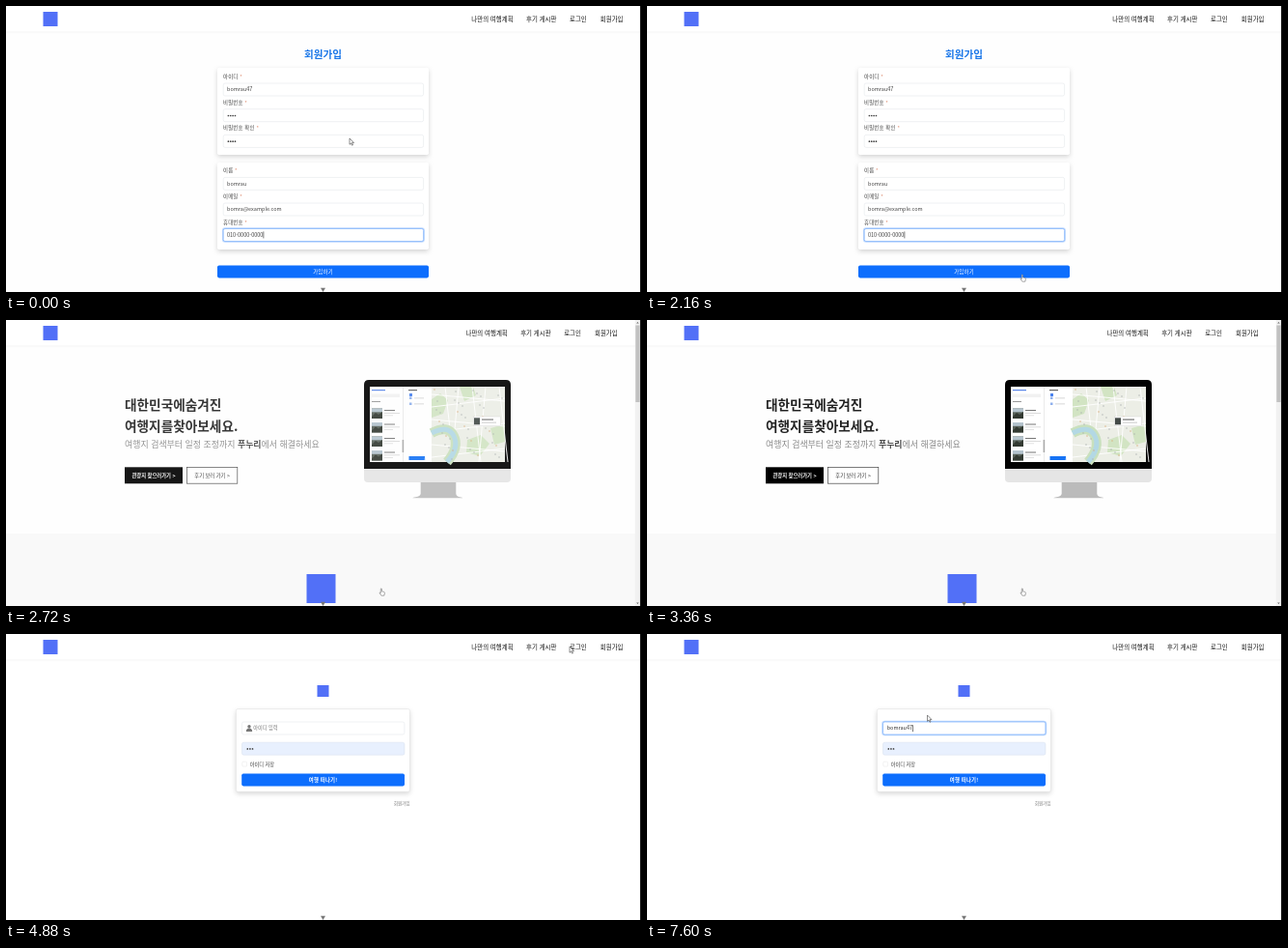
Animation, 658 px wide and 296 px high, one loop 8000 ms. Source, as an HTML page:

```html
<!DOCTYPE html>
<html lang="ko">
<head>
<meta charset="utf-8">
<title>회원가입</title>
<style>
  html, body { margin: 0; width: 100%; height: 100%; overflow: hidden; background: #fff; }
  svg { display: block; width: 100%; height: 100%; }
  text { font-family: "Noto Sans CJK KR", "Noto Sans CJK", "Noto Sans", sans-serif; white-space: pre; }
  .card { fill: #fff; filter: drop-shadow(0 2.5px 2.6px rgba(0, 0, 0, .17)); }
  .bar { fill: #fff; filter: drop-shadow(0 .8px 1.2px rgba(0, 0, 0, .1)); }
  .label { letter-spacing: .2px; }
</style>
</head>
<body>
<svg id="stage" viewBox="0 0 658 296" xmlns="http://www.w3.org/2000/svg"></svg>
<script>
const LOOP = 8000, HOME_AT = 2320, LOGIN_AT = 4800, FOCUS_AT = 5520;
const FADE_AT = 2460, FADE_TIME = 330;
const USER = 'bomrau47';
const KEY_TIMES = [6320, 6400, 6560, 6800, 7040, 7120, 7440, 7600];
const BLUE = '#0d6efd', LOGO = '#5270f7';

// Pointer keys: time, x, y, shape used from that time on
const POINTER = [
  [0, 356, 137, 'arrow'], [300, 356, 137, 'arrow'], [1180, 416, 271, 'hand'],
  [1380, 418.5, 279, 'hand'], [1500, 418.5, 279, 'hand'], [1900, 388, 277.5, 'hand'],
  [3500, 388, 277.5, 'arrow'], [4330, 588.6, 11.7, 'hand'], [4840, 588.6, 11.7, 'arrow'],
  [5400, 290, 93, 'arrow'], [5520, 290, 93, 'arrow'], [5700, 289.5, 86, 'arrow'],
  [7020, 289.5, 86, 'arrow'], [7120, 290.5, 84, 'arrow'], [LOOP, 290.5, 84, 'arrow']
];

const rect = (x, y, w, h, fill, more = '') =>
  `<rect x="${x}" y="${y}" width="${w}" height="${h}" fill="${fill}" ${more}/>`;
const path = (d, fill, more = '') => `<path d="${d}" fill="${fill}" ${more}/>`;
const text = (x, y, size, str, fill, more = '') =>
  `<text x="${x}" y="${y}" font-size="${size}" fill="${fill}" ${more}>${str}</text>`;
const group = (id, body, more = '') => `<g id="${id}" ${more}>${body}</g>`;
const times = (n, fn) => Array.from({ length: n }, (_, i) => fn(i)).join('');
const dots = (n, x, y, step, r) =>
  times(n, i => `<circle cx="${x + i * step}" cy="${y}" r="${r}" fill="#444"/>`);
const square = (cx, cy, s) => rect(cx - s / 2, cy - s / 2, s, s, LOGO);
const card = (x, y, w, h) => rect(x, y, w, h, '#fff', 'class="card" rx="1.8"');
const MID = 'text-anchor="middle"', BOLD = 'font-weight="700"';

const field = (x, y, w) =>
  rect(x, y, w, 13, '#fff', 'rx="1.8" stroke="#dfe3e7" stroke-width=".5"');
const ring = (x, y, w) =>
  rect(x, y, w, 13, 'none', 'rx="2" stroke="#0d6efd" stroke-opacity=".27" stroke-width="2.6"') +
  rect(x, y, w, 13, '#fff', 'rx="1.8" stroke="#7fb2fd" stroke-width=".7"');
const button = (x, y, w, str, weight) =>
  rect(x, y, w, 13, BLUE, 'rx="1.8"') +
  text(x + w / 2, y + 8.5, 5.4, str, '#fff', `${MID} font-weight="${weight}" class="label"`);

function header() {
  const items = [[482.3, '나만의 여행계획'], [539, '후기 게시판'], [584, '로그인'], [615.8, '회원가입']];
  const nav = items.map(([x, s]) => text(x, 15.7, 6.45, s, '#111', 'font-weight="500"')).join('');
  return rect(0, -5, 658, 31.5, '#fff', 'class="bar"') + square(46, 13.5, 15) + group('nav', nav);
}

function signupRow(label, y, value) {
  return text(225, y, 5.4, label + ' <tspan fill="#dc8264">*</tspan>', '#444', 'class="label" font-weight="500"') +
    field(225.2, y + 5, 207.4) +
    (value ? text(229, y + 13.4, 5.5, value, '#444') : dots(4, 230.4, y + 11.8, 2.35, .85));
}

function signupPage() {
  return rect(0, 27, 658, 269, '#fefefe') +
    text(328.5, 54, 10.6, '회원가입', '#1976e8', `${MID} ${BOLD}`) +
    card(219, 64, 219, 90) +
    signupRow('아이디', 75, USER) + signupRow('비밀번호', 101.7) + signupRow('비밀번호 확인', 128.4) +
    card(219, 162, 219, 90) +
    signupRow('이름', 172.4, USER.slice(0, 6)) +
    signupRow('이메일', 199, 'bomra@example.com') +
    signupRow('휴대번호', 225.6) + ring(225.2, 230.5, 207.4) +
    text(229, 239, 5.5, '010-0000-0000', '#444', 'id="phone"') +
    rect(267.2, 233.4, .6, 7, '#222', 'id="phoneCaret"') +
    button(219, 268.4, 219, '가입하기', 500);
}

function mapView() {
  const roads = times(6, i =>
    `M${441 + i * 14} 69l${i % 2 ? 9 : -7} 78M441 ${77 + i * 13}l76 ${i % 2 ? -9 : 7}`);
  const pins = times(44, i =>
    `<circle cx="${444 + i * 29 % 71}" cy="${72 + i * 17 % 73}" r=".7" fill="${i % 4 ? '#a9aeb0' : '#d9a878'}"/>`);
  return rect(441, 69, 76, 78, '#eceee6') +
    path('M441 82l9-6 8 7-5 14-12 4zM470 69l14 0 3 9-12 6zM478 124l14-5 9 9-10 13-14-4zM502 112l15-4v18l-11 3z', '#d2e4c3') +
    path(roads, 'none', 'stroke="#fff" stroke-width=".9"') +
    path('M441 117Q458 108 464 120T457 147', 'none', 'stroke="#c9e0bd" stroke-width="10"') +
    path('M441 117Q458 108 464 120T457 147', 'none', 'stroke="#b3d8e4" stroke-width="5"') +
    pins;
}

function thumb(y) {
  return rect(379, y, 11, 10.4, '#59625a') + rect(379, y, 11, 3.8, '#b4c3cd') +
    path(`M379 ${y + 8.4}l4-4 3 2 4-3v7h-11z`, '#333a32') +
    rect(392, y + 1.5, 11, 1, '#777') + rect(392, y + 4.5, 16, .7, '#ccc') +
    rect(392, y + 7, 9, .7, '#d5d5d5');
}

function screen() {
  return rect(377, 69, 140, 78, '#fff') +
    rect(379, 72, 14, 1.2, '#5a86e8') + rect(379, 76.5, 29, 3.5, '#f1f1f1') +
    rect(379, 84, 9, 1, '#999') + times(4, i => thumb(91.5 + i * 14.5)) +
    rect(411, 69, .6, 78, '#ddd') + rect(410.6, 124, 1.6, 13, '#aaa') +
    rect(417, 72, 9, 1.2, '#666') + rect(418, 76, 3, 3, '#4b83ee') +
    times(2, i => rect(418, 79.5 + i * 6, 2.5, 2.5, '#8fb0ec') + rect(423, 80.5 + i * 6, 10, .8, '#ccc')) +
    rect(417.5, 141, 17, 4, '#1673f5') + mapView() +
    rect(484.5, 100, 28, 9.5, '#fff', 'stroke="#ccc" stroke-width=".4"') +
    rect(485, 101.3, 6, 7, '#444b48') + rect(493, 102.5, 12, 1.1, '#666') + rect(493, 105.7, 15, .8, '#bbb');
}

function hero() {
  return text(123, 93.3, 13.65, '대한민국에숨겨진', '#222', BOLD) +
    text(123, 115.2, 13.65, '여행지를찾아보세요.', '#222', BOLD) +
    text(123, 131.6, 8.95, `여행지 검색부터 일정 조정까지 <tspan fill="#444" ${BOLD}>푸누리</tspan>에서 해결하세요`, '#888', 'font-weight="300"') +
    rect(123, 152.3, 60, 17, '#000') +
    text(153, 162.7, 5.3, '관광지 찾으러가기 &gt;', '#fff', `${MID} ${BOLD}`) +
    rect(187.5, 152.6, 52.3, 16.6, '#fff', 'stroke="#444" stroke-width=".7"') +
    text(213.6, 162.7, 5.3, '후기 보러 가기 &gt;', '#333', `${MID} font-weight="500"`) +
    path('M429.7 167h36.6v12.500q0 3 4 3.700q3 .4 3 1h-52q0-.6 3-1q5.400-.7 5.400-3.700z', '#bbb') +
    path('M371 153h152v11q0 4-4 4h-144q-4 0-4-4z', '#e5e5e5') +
    path('M371 154v-87q0-5 5-5h142q5 0 5 5v87z', '#020202') + screen();
}

function homePage() {
  return rect(0, 27, 658, 194, '#fefefe') + rect(0, 221, 658, 75, '#f9f9f9') +
    group('hero', hero()) + square(326.5, 278, 30);
}

const scrollbar = () =>
  rect(651.8, 0, 5.4, 296, '#f1f1f1') + rect(652.4, 5.5, 4.2, 79.5, '#c1c1c1') +
  path('M653.2 3.5h2.6l-1.3-1.5zM653.2 292.5h2.6l-1.3 1.5z', '#666');

function loginPage() {
  const hint = '<circle cx="252" cy="95.8" r="1.7" fill="#777"/>' +
    path('M248.8 101q0-3.5 3.2-3.5t3.2 3.5z', '#777') +
    text(256.3, 99.3, 5.2, '아이디 입력', '#777');
  return rect(0, 27, 658, 269, '#fff') + square(328.5, 59, 12) +
    card(238.4, 77.6, 180, 85.6) +
    rect(238.4, 77.6, 180, 85.6, 'none', 'rx="1.8" stroke="#ddd" stroke-width=".5"') +
    field(244.5, 91, 168.4) + group('focus', ring(244.5, 91, 168.4)) +
    group('hint', hint) + text(248.7, 99.4, 5.5, '', '#333', 'id="typed"') +
    rect(0, 94.2, .6, 7, '#222', 'id="caret"') +
    rect(244.5, 112.2, 168.4, 13, '#e8f0fe', 'rx="1.8" stroke="#d5deec" stroke-width=".5"') +
    dots(3, 250.3, 118.9, 2.6, .85) +
    rect(244.8, 132.2, 4.8, 4.8, '#fff', 'rx="1" stroke="#ddd" stroke-width=".4"') +
    text(252.8, 136.5, 5.2, '아이디 저장', '#444') +
    button(244.2, 144.4, 168.8, '여행 떠나기!', 700) +
    text(418.6, 176.7, 4.6, '회원가입', '#777', 'text-anchor="end"');
}

const arrow = path('M0 0v6.300l1.500-1.300 1 2.200 1-.4-1-2.200h2z', '#fff', 'stroke="#333" stroke-width=".55"');
const hand = path('M.3.7q.6-1 1.100 0v2.700l2.300.5q.8.300.7 1.100l-.5 2.700h-3l-1.700-2.400q-.3-.9.400-.7l.7.600z',
  '#fff', 'stroke="#555" stroke-width=".5"');

const stage = document.getElementById('stage');
stage.innerHTML = rect(0, 0, 658, 296, '#fff') +
  group('signup', signupPage()) + group('home', homePage()) + group('login', loginPage()) +
  header() + group('scroll', scrollbar()) +
  path('M326 291.7h5l-2.5 4.3z', '#777') + rect(657, 0, 1, 296, '#222') +
  group('pointer', group('arrow', arrow) + group('hand', hand));

const ui = {};
stage.querySelectorAll('[id]').forEach(el => ui[el.id] = el);
const show = (el, on) => el.setAttribute('visibility', on ? 'inherit' : 'hidden');
const page = (el, on) => el.setAttribute('display', on ? 'inline' : 'none');
const clamp = v => Math.min(1, Math.max(0, v));
const smooth = v => v * v * (3 - 2 * v);
const easeOut = v => smooth(Math.pow(v, .87));

function movePointer(t) {
  const i = POINTER.findIndex(k => k[0] > t) - 1;
  const [t0, x0, y0, shape] = POINTER[i], [t1, x1, y1] = POINTER[i + 1];
  const p = smooth((t - t0) / (t1 - t0));
  ui.pointer.setAttribute('transform', `translate(${x0 + (x1 - x0) * p} ${y0 + (y1 - y0) * p})`);
  show(ui.arrow, shape === 'arrow');
  show(ui.hand, shape === 'hand');
}

function draw(t) {
  const home = t >= HOME_AT && t < LOGIN_AT, login = t >= LOGIN_AT;
  page(ui.signup, t < HOME_AT);
  page(ui.home, home);
  page(ui.scroll, home);
  page(ui.login, login);
  ui.nav.setAttribute('transform', `translate(${home ? -5.8 : 0} 0)`);
  show(ui.phoneCaret, Math.floor((t + 490) / 530) % 2 === 1 || t < 40);
  ui.hero.setAttribute('opacity', easeOut(clamp((t - FADE_AT) / FADE_TIME)));

  const count = KEY_TIMES.filter(k => k <= t).length;
  show(ui.focus, t >= FOCUS_AT);
  show(ui.hint, !count);
  show(ui.caret, count);
  if (ui.typed.textContent.length !== count) ui.typed.textContent = USER.slice(0, count);
  if (login && count) ui.caret.setAttribute('x', 248.9 + ui.typed.getComputedTextLength());
  movePointer(t);
}

const start = performance.now();
function tick() {
  draw((performance.now() - start) % LOOP);
  requestAnimationFrame(tick);
}
ui.phoneCaret.setAttribute('x', 229.2 + ui.phone.getComputedTextLength());
tick();
</script>
</body>
</html>
```
